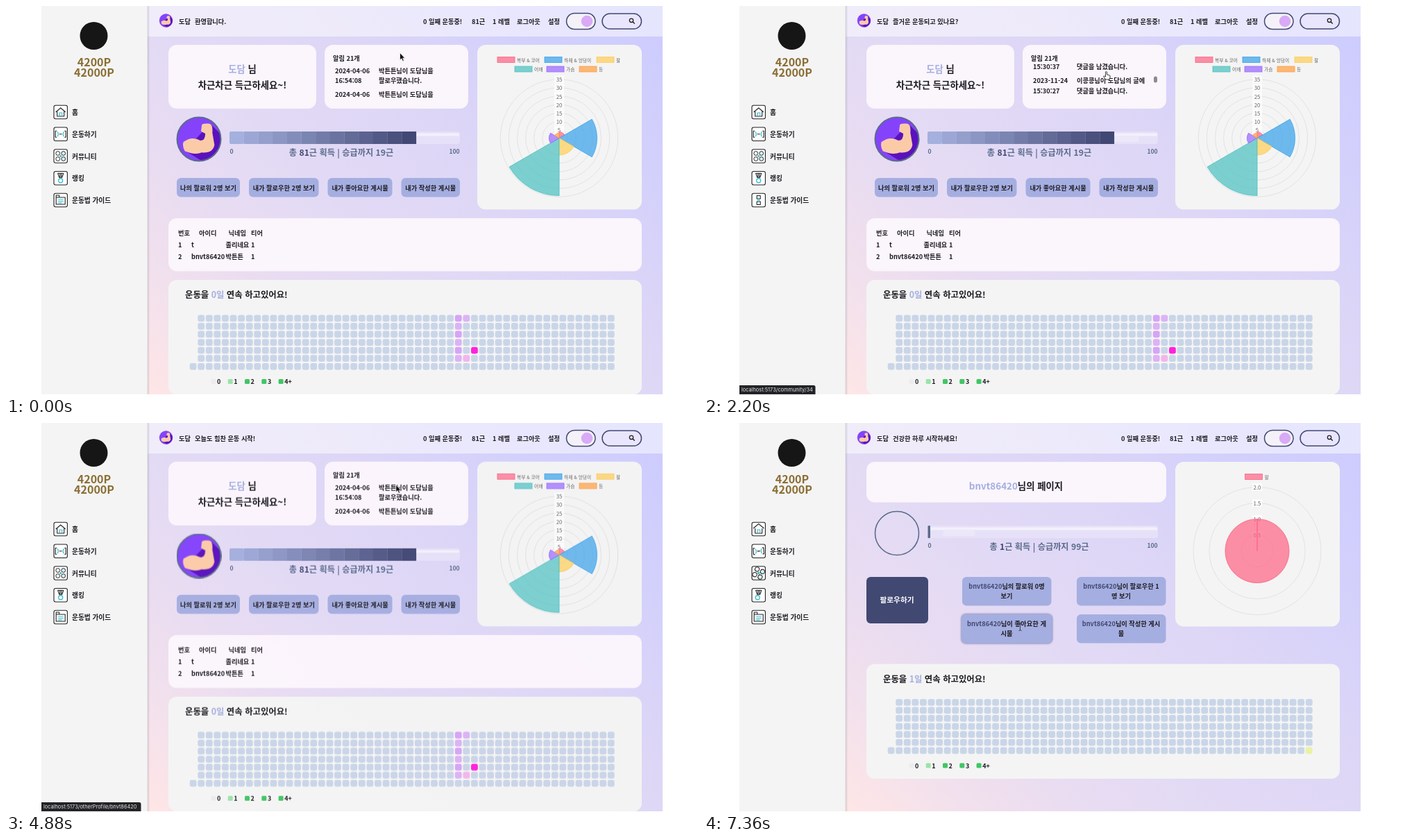
Recreate the animation shown at these times as an HTML page. Size 997x561 px, loop 7880 ms.

```html
<!DOCTYPE html>
<html lang="ko">
<head>
<meta charset="utf-8">
<style>
html, body { margin: 0; width: 100%; height: 100%; overflow: hidden; background: #fff; }
svg { display: block; width: 100vw; height: 100vh; }
text { font: 700 9.2px "Noto Sans CJK KR", "Noto Sans CJK", "Noto Sans", sans-serif; dominant-baseline: central; white-space: pre; }
.m { text-anchor: middle; }
.chart text { font-weight: 400; }
</style>
</head>
<body>
<svg id="stage" viewBox="0 0 997 561" fill="#1d1b22"></svg>
<script>
const LOOP = 7880;
const USER = '도담', FRIEND = '박튼튼', WRITER = '이콩콩', ID = 'bnvt86420';
const NAVY = '#414872', SLATE = '#5b6b8c', LILAC = '#a5aee0', PALE = '#fbf5fc', GREY = '#f4f4f4', GOLD = '#8a6d33';

const rect = (x, y, w, h, r, fill, extra = '') =>
  `<rect x="${x}" y="${y}" width="${w}" height="${h}" rx="${r}" fill="${fill}" ${extra}/>`;
const circle = (x, y, r, fill, extra = '') => `<circle cx="${x}" cy="${y}" r="${r}" fill="${fill}" ${extra}/>`;
const text = (x, y, s, size = 9.2, extra = '') => `<text x="${x}" y="${y}" style="font-size:${size}px" ${extra}>${s}</text>`;
const mid = (x, y, s, size, extra = '') => text(x, y, s, size, 'class="m" ' + extra);
const span = (s, color) => `<tspan fill="${color}">${s}</tspan>`;
const path = (d, extra = '') => `<path d="${d}" ${extra}/>`;
const range = n => [...Array(n).keys()];

const clamp = v => Math.min(1, Math.max(0, v));
const smooth = v => v * v * (3 - 2 * v);
const ramp = (t, from, to) => smooth(clamp((t - from) / (to - from)));
function track(keys, t, column) {
  let i = 0;
  while (i < keys.length - 2 && t >= keys[i + 1][0]) i++;
  const [a, b] = [keys[i], keys[i + 1]];
  return a[column] + (b[column] - a[column]) * ramp(t, a[0], b[0]);
}

function sector(cx, cy, r, from, to) {
  const at = a => `${cx + r * Math.sin(a)},${cy - r * Math.cos(a)}`;
  return `M${cx},${cy}L${at(from)}A${r},${r} 0 ${to - from > Math.PI ? 1 : 0} 1 ${at(to)}Z`;
}

const biceps = (x, y, r, border) => `<g transform="translate(${x} ${y}) scale(${r / 32})">
  ${circle(0, 0, 31, '#8443fb')}
  ${path('M16,-22L30,-8A31,31 0 0 1 4,31L-20,16Z', 'fill="#5a12bd"')}
  ${path('M4,-20Q5,-23 15,-22Q20,-21 19,-9L22,8Q20,20 4,19Q-6,23 -20,17Q-24,10 -22,4Q-10,-5 2,2Q9,2 9,-8L3,-11Z', 'fill="#fbcba8"')}
  ${circle(0, 0, 31, 'none', `stroke="${border}" stroke-width="2"`)}</g>`;

function progress(y, value) {
  const end = 322 + 332 * value / 100;
  const step = (end - 322) / 13;
  const mix = k => [164, 176, 222].map((c, i) => Math.round(c + ([66, 72, 116][i] - c) * k));
  const bands = value > 5
    ? range(13).map(i => rect(322 + i * step, y - 9, step + .2, 18, i ? 0 : 2, `rgb(${mix(i / 12)})`)).join('')
    : rect(322.5, y - 9, 3.5, 18, 1, SLATE);
  return rect(322, y - 9, 332, 18, 4, '#e6e1f8') + rect(323, y - 6.5, 330, 4, 2, '#f3f0fc') +
    rect(0, y - 2, 46, 8, 3, '#f6f3fd', 'class="shine" opacity=".35"') + bands +
    mid(325, y + 19, '0', 8.6, `fill="${SLATE}"`) + mid(646, y + 19, '100', 8.6, `fill="${SLATE}"`) +
    mid(483, y + 21, span('총 ', SLATE) + span(value, NAVY) + span(`근 획득 | 승급까지 ${100 - value}근`, SLATE), 12.2);
}

function heatmap(y, days, colorAt) {
  let s = rect(234, y, 682, 165.5, 12, GREY) +
    text(258, y + 21, '운동을 ' + span(days + '일', LILAC) + ' 연속 하고있어요!', 12.4);
  for (let col = 0; col < 53; col++)
    for (let row = col ? 0 : 6; row < 7; row++)
      s += rect(264.7 + col * 11.58, y + 50.4 + row * 11.58, 9.8, 9.8, 3, colorAt(col, row) || '#c9d6e8');
  ['#ececec', '#9be3a8', '#42c566', '#42c566', '#42c566'].forEach((c, i) => {
    s += rect(295.4 + i * 24.3, y + 143, 7, 7, 1.5, c) + text(304 + i * 24.3, y + 146.5, i < 4 ? i : '4+', 9);
  });
  return s;
}

const legend = (x, y, color, border, label) =>
  rect(x, y - 4, 25, 8, 0, color, `stroke="${border}" stroke-width=".8"`) + text(x + 28, y, label, 6.7, 'fill="#666"');

function rings(cx, cy, step, count, label) {
  const circles = range(count).map(i => circle(cx, cy, step * (i + 1), 'none', 'stroke="#dedede" stroke-width=".8"'));
  const ticks = range(count).map(i => rect(cx - 7, cy - step * (i + 1) - 5.5, 14, 11, 0, '#fff', 'opacity=".75"') +
    mid(cx, cy - step * (i + 1), label(i + 1), 7.8, 'fill="#666"'));
  return circles.concat(ticks).join('');
}

function muscleChart() {
  const parts = [
    ['복부 &amp; 코어', 708, 77.5, '255,99,132', 9], ['하체 &amp; 엉덩이', 776, 77.5, '54,162,235', 54.5],
    ['팔', 851, 77.5, '255,206,86', 24.5], ['어깨', 733, 91, '75,192,192', 83],
    ['가슴', 779, 91, '153,102,255', 14.5], ['등', 826, 91, '255,159,64', 7.5]];
  return '<g class="chart">' + rect(679, 56, 237, 237.5, 12, GREY) + rings(797, 190.5, 12.1, 7, i => i * 5) +
    parts.map(([name, x, y, rgb, r], i) => legend(x, y, `rgba(${rgb},.7)`, `rgb(${rgb})`, name) +
      path(sector(797, 190.5, r, i * Math.PI / 3, (i + 1) * Math.PI / 3),
        `fill="rgba(${rgb},.7)" stroke="rgb(${rgb})" stroke-width=".8"`)).join('') + '</g>';
}

function notices() {
  const stamps = ['16:54:08', '16:54:02', '16:21:40', '15:32:16', '15:31:52', '15:31:20', '15:30:51', '15:30:37', '15:30:27', '15:30:23'];
  return range(21).map(i => {
    const y = 92.5 + i * 34.5, follow = i < 2;
    return text(474, y, follow ? '2024-04-06' : '2023-11-24') +
      text(537, y, follow ? `${FRIEND}님이 ${USER}님을` : `${WRITER}님이 ${USER}님의 글에`) +
      text(474, y + 14.8, stamps[i] || `15:29:${58 - i}`) +
      text(537, y + 14.8, follow ? '팔로우했습니다.' : '댓글을 남겼습니다.');
  }).join('');
}

function myPage() {
  const buttons = [[246, 91, '나의 팔로워 2명 보기'], [350, 100.5, '내가 팔로우한 2명 보기'],
    [463.5, 93, '내가 좋아요한 게시물'], [569.5, 84.5, '내가 작성한 게시물']];
  const rows = [['번호', '아이디', '닉네임', '티어'], ['1', 't', '졸리네요', '1'], ['2', ID, FRIEND, '1']];
  const columns = [[248, 278, 320.5, 353], [248, 267, 316.5, 353], [248, 267, 316.5, 353]];
  const heat = (c, r) => c === 33 && r < 6 ? (r % 2 ? '#dcb2f5' : '#d6a4f7')
    : c === 34 && r === 0 ? '#dcb4f5' : c === 34 && r === 5 ? '#f2b6ea' : c === 35 && r === 4 ? '#ff21dd' : '';
  return rect(234, 56, 213, 92, 12, PALE) + mid(340.5, 90, span(USER, LILAC) + ' 님', 13.4) +
    mid(340.5, 112.5, '차근차근 득근하세요~!', 13.4) +
    rect(459, 56, 207, 92, 12, PALE) + text(471, 75, '알림 21개') +
    `<g clip-path="url(#listClip)"><g id="list">${notices()}</g></g>` +
    rect(648, 0, 5, 9, 2.5, '#8c8a90', 'id="thumb"') +
    muscleChart() + biceps(278, 192, 32.5, SLATE) + progress(190, 81) +
    buttons.map(([x, w, s]) => rect(x, 248, w, 27.5, 6, LILAC) + mid(x + w / 2, 261.5, s)).join('') +
    rect(234, 306, 682, 76.5, 12, PALE) +
    rows.map((row, i) => row.map((s, j) => text(columns[i][j], 326.5 + i * 17.2, s)).join('')).join('') +
    heatmap(395, 0, heat);
}

function friendPage() {
  const buttons = [[372, 222, '님의 팔로워 0명', '보기'], [537, 222, '님이 팔로우한 1', '명 보기'],
    [372, 276, '님이 좋아요한 게', '시물'], [537, 276, '님이 작성한 게시', '물']];
  return rect(234, 56, 432, 58.5, 12, PALE) + mid(449.5, 90, span(ID, LILAC) + '님의 페이지', 13.4) +
    circle(278, 159, 31.5, 'none', `stroke="${SLATE}" stroke-width="1.6"`) + progress(157, 1) +
    rect(234, 222, 89, 67, 6, NAVY) + mid(278, 254.5, '팔로우하기', 10.7, 'fill="#fff"') +
    buttons.map(([x, y, a, b], i) => `<g id="button${i}">` +
      rect(x, y, 128.5, 41.5, 6, '#59618f', 'class="shadow" filter="url(#blur)" opacity="0"') +
      rect(x, y, 128.5, 41.5, 6, LILAC) +
      mid(x + 64, y + 13, span(ID, NAVY) + a) + mid(x + 64, y + 27.3, b) + '</g>').join('') +
    '<g class="chart">' + rect(679, 56, 237, 237.5, 12, GREY) + legend(779.5, 77.5, '#fb8fa5', '#ff6384', '팔') +
    rings(797, 184.5, 23, 4, i => (i / 2).toFixed(1)) +
    '<path id="pie" fill="rgba(255,99,132,.7)" stroke="#ff6384" stroke-width=".8"/></g>' +
    heatmap(347.5, 1, (c, r) => c === 52 && r === 6 ? '#eaf2a4' : '');
}

function sidebar() {
  const line = 'fill="none" stroke="#222" stroke-width="1.1" stroke-linejoin="round"';
  const cyan = 'fill="none" stroke="#35bccb" stroke-width="1.2"';
  const icons = [
    '<g id="roof">' + path('M-7,0L0,-6L7,0', line) + '</g>' + path('M-5,-1V6H5V-1', line) + path('M-1.5,6V1H2V6', cyan),
    '<g id="bar">' + path('M-5.5,-4.5H-7.5V4.5H-5.5M5.5,-4.5H7.5V4.5H5.5M-2,0H2', line) + path('M-4.5,-3.5Q-2.5,0 -4.5,3.5M4.5,-3.5Q2.5,0 4.5,3.5', cyan) + '</g>',
    '<g id="people">' + [[-4, -4], [4, -4], [-4, 4], [4, 4]].map(([x, y], i) => circle(x, y, 2.9, i % 2 ? '#d9f3f6' : '#fff', 'stroke="#222"')).join('') +
      circle(0, 0, 1.6, '#35bccb') + '</g>',
    path('M-4,-7H4L2,-1H-2ZM-1,-7V-1M1,-7V-1', line) + '<g id="medal">' + circle(0, 3.5, 3, 'none', 'stroke="#35bccb" stroke-width="1.3"') + '</g>',
    '<g id="guide">' + path('M-6.5,-4H6.5V6H-6.5ZM-6.5,-4V-7H-2V-4', line) + path('M-3.5,-1H4M-3.5,1.5H4M-3.5,3.8H2', cyan) + '</g>' +
      '<g id="weight">' + path('M-2.5,-6.5H2.5V-2H-2.5ZM-2.5,2H2.5V6.5H-2.5Z', line) + path('M-1,-2V2M1,-2V2', cyan) + '</g>'];
  const labels = ['홈', '운동하기', '커뮤니티', '랭킹', '운동법 가이드'];
  return rect(51, 0, 152.5, 560, 0, GREY) + rect(203.5, 0, 4, 560, 0, 'url(#edge)') +
    circle(126.5, 43, 20, '#161616') +
    mid(127, 79.5, '4200P', 16, `fill="${GOLD}"`) + mid(127, 94.5, '42000P', 16, `fill="${GOLD}"`) +
    labels.map((s, i) => {
      const y = 153 + i * 31.75;
      return rect(69, y - 9.7, 19.4, 19.4, 2.5, '#fff', 'stroke="#222" stroke-width="1.1"') +
        `<g transform="translate(78.7 ${y})">${icons[i]}</g>` + text(95, y, s, 9.7);
    }).join('');
}

function header() {
  const nav = [[601, '0 일째 운동중!'], [671, '81근'], [701, '1 레벨'], [736, '로그아웃'], [781, '설정']];
  const border = `stroke="${NAVY}" stroke-width="1.5"`;
  return rect(204, 0, 742, 44, 0, '#fff', 'opacity=".5"') + biceps(230.5, 21, 9.7, '#7a3cf0') + text(249, 21.5, USER) +
    text(272, 21.5, '', 9.2, 'id="greeting"') + nav.map(([x, s]) => text(x, 21.5, s)).join('') +
    rect(807.5, 10.5, 41.5, 23, 11.5, '#f4f2f8', border) + circle(837, 22, 8.3, '#d9aaf6') +
    rect(859, 11, 56.5, 22, 11, '#e9e5fd', border) +
    circle(901, 20.8, 2.7, 'none', 'stroke="#222" stroke-width="1.3"') +
    path('M903,22.8L905.7,25.5', 'stroke="#222" stroke-width="1.5"');
}

const pointer = `<g id="cursor">
  ${path('M0,0V10.5L2.4,8.3L4,12L5.8,11.2L4.2,7.7H7.2Z', 'data-kind="arrow" fill="#111" stroke="#fff" stroke-width=".7"')}
  ${path('M-1,0Q0,-1.2 1,0V4L5,5Q6,5.5 5.5,8L4.5,11H-1L-4,6.5Q-3.5,5 -1,7Z', 'data-kind="hand" fill="#fff" stroke="#222" stroke-width=".9"')}
  ${path('M-2,-5.5Q0,-5.5 0,-4V4Q0,5.5 -2,5.5M2,-5.5Q0,-5.5 0,-4M0,4Q0,5.5 2,5.5', 'data-kind="beam" fill="none" stroke="#333" stroke-width=".9"')}</g>`;

const stops = [[0, '#ffe6e6'], [.12, '#f3e1ec'], [.28, '#e8dcf2'], [.42, '#e2daf5'], [.62, '#ddd6f6'], [.78, '#d4d1fb'], [1, '#cccbfe']];
const $ = id => document.getElementById(id);
$('stage').innerHTML = `<defs>
  <linearGradient id="sky" gradientUnits="userSpaceOnUse" x1="204" y1="560" x2="855" y2="-91">
    ${stops.map(([o, c]) => `<stop offset="${o}" stop-color="${c}"/>`).join('')}</linearGradient>
  <linearGradient id="edge"><stop stop-color="#556" stop-opacity=".22"/><stop offset="1" stop-color="#556" stop-opacity="0"/></linearGradient>
  <clipPath id="listClip"><rect x="460" y="82.5" width="205" height="51.5"/></clipPath>
  <clipPath id="view"><rect x="204" y="44" width="742" height="516"/></clipPath>
  <filter id="blur" x="-20%" y="-40%" width="140%" height="180%"><feGaussianBlur stdDeviation="1.8"/></filter></defs>
  ${rect(204, 0, 742, 560, 0, 'url(#sky)')}
  <g clip-path="url(#view)"><g id="mine">${myPage()}</g><g id="friend">${friendPage()}</g></g>
  ${header()}${sidebar()}
  <g id="status">${path('', 'id="statusBox" fill="#222326"')}
  <text id="statusText" x="54" y="553.8" fill="#e4e4e6" style="font:400 7.4px Inter,sans-serif"></text></g>${pointer}`;

const scrollKeys = [[650, 0], [1480, 292], [1640, 292], [2200, 261.5], [2720, 0], [2800, 0]];
const cursorKeys = [[520, 567.5, 67.5], [900, 579.5, 95], [2500, 579.5, 95], [2900, 562.5, 88.5], [4500, 562.5, 88.5],
  [5300, 561, 90], [5400, 561, 90], [5700, 590, 290], [5880, 485.5, 323], [6300, 474, 330], [6800, 448, 300], [7200, 455.5, 294], [7360, 455.5, 294]];
const greetings = [[0, '환영합니다.'], [1350, '즐거운 운동되고 있나요?'], [4100, '오늘도 힘찬 운동 시작!'], [6850, '건강한 하루 시작하세요!']];
const links = [[0, ''], [850, 'otherProfile/' + ID], [1700, 'community/34'], [2760, 'otherProfile/' + ID], [5480, '']];
const cursorKinds = [[0, 'arrow'], [850, 'hand'], [4840, 'arrow'], [6500, 'beam']];
const current = (list, t) => list.filter(([from]) => t >= from).pop()[1];
const move = (id, value) => $(id).setAttribute('transform', value);
const fade = (id, value) => $(id).setAttribute('opacity', value);

function hover(index, cx, cy, amount) {
  const scale = 1 + .016 * amount;
  move('button' + index, `translate(${cx} ${cy}) scale(${scale}) translate(${-cx} ${-cy})`);
  $('button' + index).querySelector('.shadow').setAttribute('opacity', amount);
}

function drawIcons(t) {
  const phase = t % 1000 / 1000;
  const alt = ramp(phase, .24, .34) - ramp(phase, .85, .88);
  move('roof', `translate(0 ${-alt}) scale(${1 + .1 * alt})`);
  move('bar', `rotate(${8 * Math.sin(t / 210) * alt})`);
  move('people', `rotate(${24 * alt}) scale(${1 + .06 * alt})`);
  move('medal', `translate(${-1.5 * alt} 0)`);
  const turn = t % 2500 / 2500;
  const upright = turn > .4 && turn < .92;
  fade('guide', upright ? 0 : 1);
  fade('weight', upright ? 1 : 0);
  move('weight', `rotate(${35 * (1 - ramp(turn, .66, .84))})`);
}

function render(t) {
  const scroll = track(scrollKeys, t, 1);
  move('list', `translate(0 ${-scroll})`);
  move('thumb', `translate(0 ${83.5 + scroll * .069})`);
  fade('thumb', ramp(t, 640, 720) - ramp(t, 2900, 3100));

  const leave = ramp(t, 4840, 5300), enter = ramp(t, 5330, 5760);
  fade('mine', 1 - leave);
  move('mine', `translate(0 ${-12 * leave})`);
  fade('friend', enter);
  move('friend', `translate(0 ${-12 * (1 - enter)})`);

  const grow = 1 - (1 - clamp((t - 5333) / 833)) ** 4;
  $('pie').setAttribute('d', sector(797, 184.5, 46 * grow, 0, Math.min(grow * 2 * Math.PI, 2 * Math.PI - .0005)));
  hover(3, 601, 297, ramp(t, 5640, 5740) - ramp(t, 5800, 6000));
  hover(2, 436, 297, ramp(t, 6500, 6700));

  const sweep = t % 2400 / 2400;
  document.querySelectorAll('.shine').forEach(el => el.setAttribute('x', 326 + 278 * sweep));

  $('greeting').textContent = current(greetings, t);
  const link = current(links, t);
  fade('status', link ? 1 : 0);
  $('statusText').textContent = 'localhost:5173/' + link;
  $('statusBox').setAttribute('d', `M51,547H${link.startsWith('c') ? 158 : 192}q2.5,0 2.5,2.5V560H51Z`);

  move('cursor', `translate(${track(cursorKeys, t, 1)} ${track(cursorKeys, t, 2)})`);
  const kind = current(cursorKinds, t);
  document.querySelectorAll('[data-kind]').forEach(el => el.setAttribute('opacity', el.dataset.kind === kind ? 1 : 0));
  drawIcons(t);
}

const start = performance.now();
(function tick() {
  render((performance.now() - start) % LOOP);
  requestAnimationFrame(tick);
})();
</script>
</body>
</html>
```
